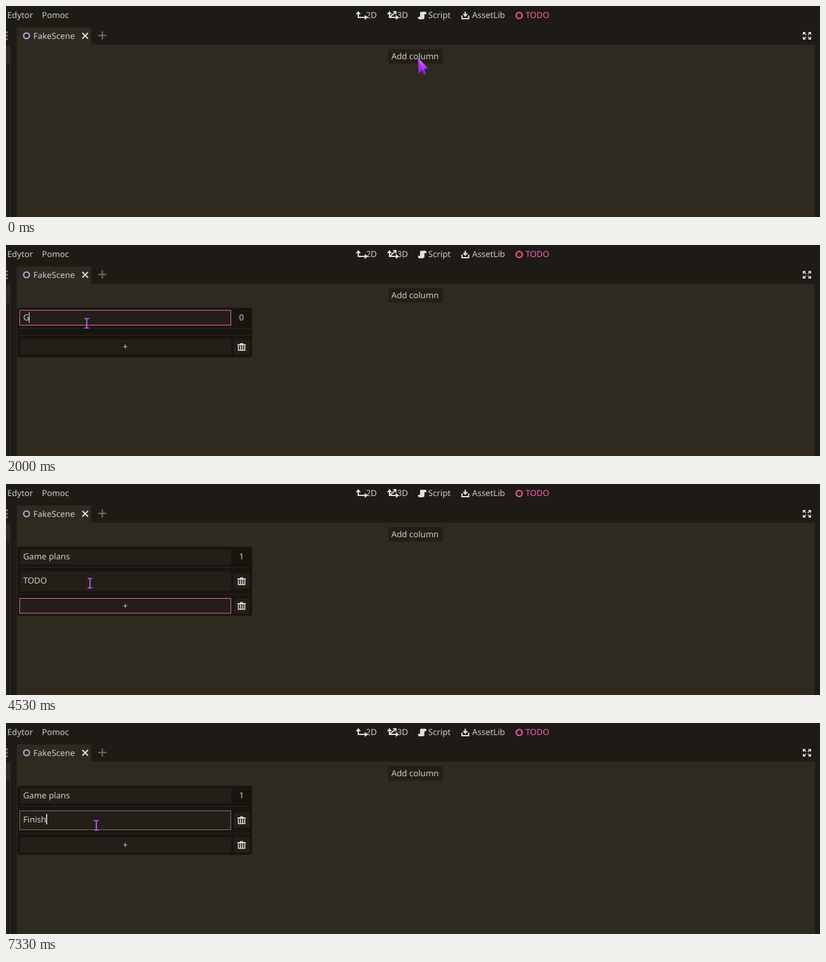
An HTML page that plays this animation: 1280 by 333 pixels, repeating every 8000 ms.

```html
<!DOCTYPE html>
<html lang="en">
<head>
<meta charset="utf-8">
<title>Task board</title>
<style>
html, body { margin: 0; width: 100%; height: 100%; overflow: hidden; background: #1e1a16; }
svg { display: block; width: 1280px; height: 333px; }
text { font: 13.2px "Noto Sans", sans-serif; fill: #cfcdc9; white-space: pre; text-rendering: geometricPrecision; }
.line { fill: none; stroke: #e0dedb; stroke-width: 2; }
.solid { fill: #e0dedb; }
.field { fill: #231f18; }
.rule { fill: #2b271f; }
.focus { fill: none; stroke: #f068a8; }
.selection { fill: #803f5b; }
.caret { fill: #e6e4e1; }
</style>
</head>
<body>
<svg viewBox="0 0 1280 333">
  <defs>
    <linearGradient id="glow" x1="0" y1="0" x2=".7" y2="1">
      <stop offset="0" stop-color="#f08cff"/>
      <stop offset=".55" stop-color="#c545ff"/>
      <stop offset="1" stop-color="#8212e8"/>
    </linearGradient>
    <g id="trash">
      <rect class="field" x="358" y="-12" width="25" height="24" rx="1"/>
      <path class="solid" d="M368-6h5v1.500h4v2h-13v-2h4z"/>
      <path d="M365.500-2v7.200h10V-2M368.800-2v7M372.200-2v7" class="line" stroke-width="1.500" style="stroke-width:1.600"/>
    </g>
  </defs>

  <rect width="1280" height="333" fill="#1e1a16"/>
  <path d="M0 62H7V333H0zM17 61H1272V333H17zM17 34H134V62H17z" fill="#2f2a20"/>
  <path d="M0 92.500H4.500V333H0" fill="#231f18" stroke="#181410"/>
  <path d="M0 40h3v3H0zM0 45.500h3v3H0zM0 51h3v3H0z" fill="#6d6a66"/>

  <text x="2" y="19">Edytor</text>
  <text x="56.500" y="19">Pomoc</text>
  <text x="566" y="19">2D</text>
  <text x="615" y="19">3D</text>
  <text x="664" y="19">Script</text>
  <text x="733" y="19">AssetLib</text>
  <text x="817" y="19" style="fill:#ff5fae">TODO</text>
  <text x="43" y="51.500">FakeScene</text>

  <path class="line" d="M554 11V18H565M603 11V18H613M603 18L611 11"/>
  <path class="solid" d="M554 8l4 5h-8zM569 18l-5 4v-8zM603 8l4 5h-8zM618 18l-5 4v-8zM614 8v6l-6-6z"/>
  <path class="solid" d="M653 9h6q2 0 2 2v2h-3v5q0 3-3 3h-5q-2 0-2-2v-2h3v-6q0-2 2-2z"/>
  <path class="line" d="M717 15v5h10.500v-5M722.200 9v5"/>
  <path class="solid" d="M718 12.500h8.500l-4.250 5z"/>
  <circle cx="807" cy="15" r="4.800" class="line" style="stroke:#ff5fae"/>
  <circle cx="32.300" cy="47" r="4.500" class="line" style="stroke:#a3b7dc"/>
  <path class="line" d="M120 42.500l9 9M129 42.500l-9 9"/>
  <path class="line" d="M151.500 40v13M145 46.500h13" style="stroke:#716e69"/>
  <path class="line" d="M1254 41.500l4 4M1265 41.500l-4 4M1254 52.500l4-4M1265 52.500l-4-4" style="stroke-width:1.600"/>
  <path class="solid" d="M1253 41h5l-5 5zM1266 41v5l-5-5zM1253 53v-5l5 5zM1266 53h-5l5-5z"/>

  <rect class="field" x="601" y="68" width="86" height="23"/>
  <rect class="focus" id="addFocus" x="601" y="68.500" width="85.500" height="22.500"/>
  <text x="606" y="84">Add column</text>

  <g id="column">
    <rect id="panel" x="18" y="99" width="369" height="78" rx="4" fill="#181410"/>
    <rect class="field" x="22" y="103" width="332" height="24" rx="1"/>
    <rect class="rule" x="20" y="131" width="364" height="1"/>
    <rect class="selection" id="nameSel" x="27" y="106" height="17"/>
    <text id="name" x="27" y="119"></text>
    <rect class="caret" id="nameCaret" y="106" width="1" height="17"/>
    <rect class="focus" id="nameFocus" x="21.500" y="103" width="332" height="23.500"/>
    <text id="count" x="366.500" y="119"></text>
    <g id="row">
      <rect class="field" x="22" y="138" width="332" height="31" rx="1"/>
      <use href="#trash" y="153.500"/>
      <rect class="selection" id="taskSel" x="27" y="142" height="20"/>
      <text id="task" x="27" y="156.500"></text>
      <rect class="caret" id="taskCaret" y="143.500" width="1.600" height="16.500"/>
      <rect id="taskFocus" x="21.500" y="138.500" width="332" height="30" fill="none" stroke="#77736a"/>
    </g>
    <g id="footer">
      <rect class="rule" x="20" y="142" width="364" height="1"/>
      <rect class="field" x="22" y="149" width="332" height="24" rx="1"/>
      <rect class="focus" id="plusFocus" x="21.500" y="149" width="332" height="23.500"/>
      <text x="183.700" y="165">+</text>
      <use href="#trash" y="161"/>
    </g>
  </g>

  <g id="arrow">
    <path d="M0 0L16 16.500L9.500 17.500L13 25L9.500 26.500L6 19.500L1 24.500z" fill="url(#glow)"/>
    <path d="M0 0L1 24.500L6 19.500L9.500 26.500L11 25.800z" fill="#7d0be0" opacity=".5"/>
  </g>
  <path id="beam" d="M-3.500-7H-1.500L0-6L1.500-7H3.500M0-6V7M-3.500 8H-1.500L0 7L1.500 8H3.500" fill="none" stroke="#ad59e0" stroke-width="2"/>
</svg>

<script>
const LOOP = 8000;
const TICK = 1000 / 15;
const $ = id => document.getElementById(id);

// Pointer keys: time, x, y
const pointerPath = [
  [0, 648, 82], [133, 648, 82], [267, 645, 82], [733, 645, 82],
  [800, 635, 86], [933, 480, 128], [1067, 240, 153], [1200, 135, 127],
  [1267, 127, 123], [4133, 127, 123], [4333, 132, 155], [4400, 132, 156],
  [4600, 132, 156], [5067, 142, 161], [LOOP, 142, 161]
];

// Typed values: time, text
const nameSteps = [
  [0, "Column name"], [2000, "G"], [2200, "Ga"], [2333, "Gam"], [2467, "Game"],
  [2533, "Game "], [2733, "Game p"], [3200, "Game pl"], [3267, "Game pla"],
  [3467, "Game plan"], [3600, "Game plans"]
];
const taskSteps = [
  [0, "TODO"], [6600, "F"], [6800, "Fi"], [6933, "Fin"],
  [7133, "Fini"], [7267, "Finis"], [7333, "Finish"]
];

const valueAt = (steps, t) => steps.findLast(([start]) => t >= start)[1];
const show = (id, on) => { $(id).style.display = on ? "" : "none"; };
const within = (t, from, to) => t >= from && t < to;

function pointerAt(t) {
  const i = Math.max(1, pointerPath.findIndex(([time]) => time >= t));
  const [t0, x0, y0] = pointerPath[i - 1];
  const [t1, x1, y1] = pointerPath[i];
  const k = (t - t0) / (t1 - t0);
  return [x0 + (x1 - x0) * k, y0 + (y1 - y0) * k];
}

function drawInput(id, text, focused, selected) {
  const label = $(id);
  if (label.textContent !== text) label.textContent = text;
  show(id + "Focus", focused);
  show(id + "Caret", focused);
  show(id + "Sel", selected);
  const width = label.getComputedTextLength();
  $(id + "Caret").setAttribute("x", Math.round(27 + width - 0.4));
  $(id + "Sel").setAttribute("width", width);
}

function draw(time) {
  const t = Math.floor((time % LOOP + 5) / TICK) * TICK + 1;
  const hasColumn = t >= 733;
  const hasTask = t >= 4533;

  show("column", hasColumn);
  show("row", hasTask);
  show("addFocus", within(t, 666, 1333));
  show("plusFocus", within(t, 4466, 5200));
  $("panel").setAttribute("height", hasTask ? 109 : 78);
  $("footer").setAttribute("transform", `translate(0 ${hasTask ? 31.5 : 0})`);
  $("count").textContent = hasTask ? "1" : "0";

  if (hasColumn) drawInput("name", valueAt(nameSteps, t), within(t, 1333, 4466), within(t, 1600, 2000));
  if (hasTask) drawInput("task", valueAt(taskSteps, t), t >= 5200, within(t, 5466, 6600));

  const [x, y] = pointerAt(t);
  const overField = hasColumn && x > 21 && x < 354 &&
    (within(y, 103, 127) || hasTask && within(y, 138, 169));
  show("arrow", !overField);
  show("beam", overField);
  $(overField ? "beam" : "arrow").setAttribute("transform", `translate(${x} ${y})`);
}

const start = performance.now();
function frame() {
  draw(performance.now() - start);
  requestAnimationFrame(frame);
}
frame();
</script>
</body>
</html>
```
